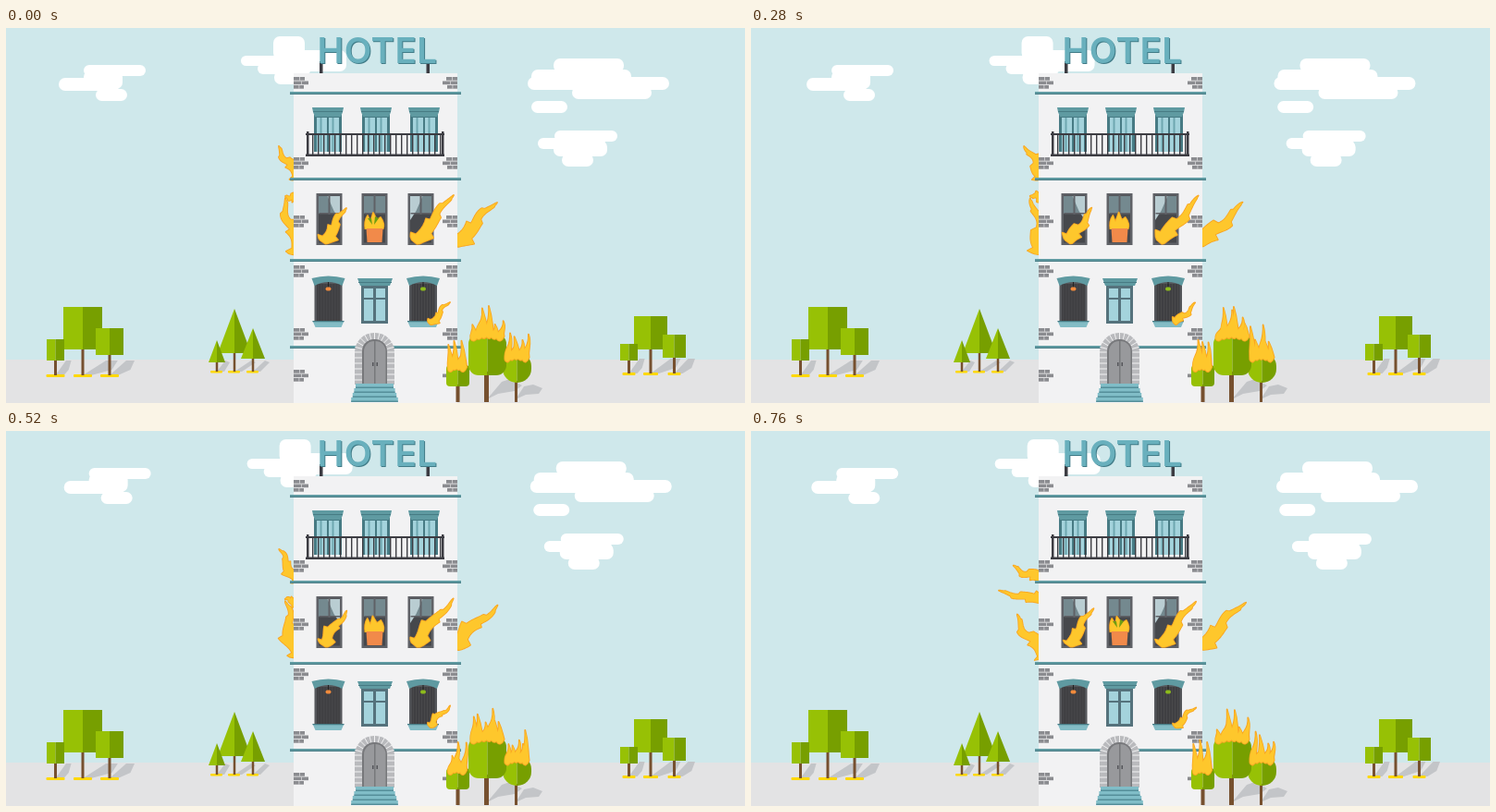
These frames come from a looping animation (799 px wide and 406 px high, 800 ms). An HTML page with a canvas:

```html
<!DOCTYPE html>
<html lang="en">
<head>
<meta charset="utf-8">
<title>Hotel fire</title>
<style>
html, body { margin: 0; width: 100%; height: 100%; overflow: hidden; background: #cfe8eb; }
canvas { display: block; }
</style>
</head>
<body>
<canvas id="stage" width="799" height="406"></canvas>
<script>
const g = document.getElementById('stage').getContext('2d');
const LOOP = 800, STEP = 40, TURN = Math.PI * 2;
const TEAL = '#5f9aa1', DEEP = '#477b84', GLASS = '#a4d3dc', DARK = '#3c3c42', GREY = '#8b8c90';
const LIGHT_GREEN = '#97c105', DARK_GREEN = '#779f00', TRUNK = '#76502f', SHADE = '#c3c5c8';

function box(color, x, y, w, h, r = 0) {
  g.fillStyle = color;
  g.beginPath();
  g.roundRect(x, y, w, h, r);
  g.fill();
}

function poly(color, ...p) {
  g.fillStyle = color;
  g.beginPath();
  for (let i = 0; i < p.length; i += 2) g.lineTo(p[i], p[i + 1]);
  g.fill();
}

// ---------- sky ----------
// drift per loop, then pills: left, top, right, bottom
const clouds = [
  [8.7, [84, 40, 151, 52], [84, 46, 126, 66], [57, 54, 123, 68], [97, 66, 131, 79]],
  [10.2, [289, 9, 323, 34], [300, 24, 368, 47], [254, 30, 322, 41], [272, 38, 330, 50], [290, 46, 322, 61]],
  [4.2, [592, 33, 668, 48], [568, 45, 676, 66], [564, 53, 717, 67], [612, 63, 698, 77]],
  [3.4, [568, 79, 607, 92]],
  [10.4, [593, 111, 661, 123], [575, 119, 648, 131], [592, 122, 650, 139], [601, 136, 635, 150]],
];

function drawSky(t) {
  box('#cfe8eb', 0, 0, 799, 406);
  for (const [drift, ...pills] of clouds)
    for (const [l, top, r, b] of pills)
      box('#fff', l + drift * t / LOOP, top, r - l, b - top, Math.min(7, (b - top) / 2));
  box('#e3e3e4', 0, 359, 799, 47);
}

// ---------- trees ----------
function crown(x, y, w, h, r = 0) {
  g.save();
  g.beginPath();
  g.roundRect(x, y, w, h, r);
  g.clip();
  box(LIGHT_GREEN, x, y, w / 2, h);
  box(DARK_GREEN, x + w / 2, y, w / 2, h);
  g.restore();
}

function trunk(x, y, bottom, w = 3) {
  box(TRUNK, x - w / 2, y, w, bottom - y);
}

function squareTree(x, y, w, h, bottom, patch = 20) {
  const c = x + w / 2;
  poly(SHADE, c, bottom, c + w * .6, bottom - 16, c + w * .9, bottom - 16, c + w * .75, bottom - 6, c + 9, bottom);
  box('#ffd800', c - patch / 2, bottom - 1, patch, 3, 1);
  trunk(c, y + h, bottom);
  crown(x, y, w, h);
}

function conifer(x, y, half, base, bottom) {
  poly(SHADE, x, bottom, x + half, bottom - 12, x + half + 5, bottom - 10, x + 8, bottom);
  box('#ffd800', x - 7, bottom - 1, 13, 2.5, 1);
  trunk(x, base - 2, bottom, 2.5);
  poly(LIGHT_GREEN, x, y, x - half, base, x, base);
  poly(DARK_GREEN, x, y, x + half, base, x, base);
}

function drawTrees() {
  squareTree(62, 302, 42, 46, 376);
  squareTree(44, 337, 19, 23, 376);
  squareTree(97, 325, 30, 29, 376);
  conifer(247, 304, 18, 352, 372);
  conifer(228, 338, 9, 362, 372);
  conifer(267, 325, 13, 358, 372);
  squareTree(679, 312, 36, 36, 374, 16);
  squareTree(664, 342, 19, 18, 374, 14);
  squareTree(710, 332, 25, 25, 374, 14);
}

function drawFrontTrees() {
  poly(SHADE, 520, 402, 536, 383, 545, 380, 558, 387, 550, 393, 532, 396);
  poly(SHADE, 551, 402, 560, 388, 570, 386, 580, 390, 576, 396, 562, 397);
  trunk(488.5, 386, 405, 4);
  trunk(551.5, 382, 405);
  trunk(519.5, 372, 405, 5);
  crown(476, 365, 25, 23, 4);
  crown(537, 353, 31, 31, [13, 13, 15, 15]);
  crown(500, 331, 41, 45, 11);
}

// ---------- building ----------
function quoin(y) {
  [12, 16, 11].forEach((w, i) => {
    const top = y + i * 4.5;
    for (const x of [311, 488 - w]) {
      box(GREY, x, top, w, 3.7);
      box('#d8d8da', x + w / 2, top, .8, 3.7);
    }
  });
}

function sign() {
  box(DARK, 339, 36, 3.5, 13);
  box(DARK, 454.5, 36, 3.5, 13);
  g.font = '600 38.5px Inter, "Open Sans", sans-serif';
  g.letterSpacing = '.5px';
  g.textAlign = 'center';
  for (const [color, d] of [['#417c88', 1], ['#69b0bd', 0]]) {
    g.fillStyle = color;
    g.fillText('HOTEL', 401.5 + d, 38 + d / 2);
  }
}

function topWindow(c) {
  box(DEEP, c - 15, 94, 30, 40);
  for (const x of [-12, 1]) {
    box(GLASS, c + x, 97, 11, 37);
    box('#6ea7b0', c + x + 3.5, 97, 2, 37);
  }
  poly(TEAL, c - 17, 86, c + 17, 86, c + 16, 91, c + 14, 96, c - 14, 96, c - 16, 91);
  box(DEEP, c - 16, 90, 32, 1);
}

function balcony() {
  for (let x = 331; x < 470; x += 6) box(DARK, x, 115, 1.4, 23);
  box(DARK, 324, 114, 150, 2);
  box(DARK, 324, 136.5, 150, 2.5);
  box(DARK, 325, 112, 2.5, 27);
  box(DARK, 471, 112, 2.5, 27);
}

// side: where the curtain hangs, 0 for none
function openWindow(c, side) {
  box('#5f6166', c - 14, 179, 28, 56);
  box('#46484c', c - 11.5, 181.5, 23, 51);
  box('#74898f', c - 11.5, 182, 23, 19);
  if (side) {
    const edge = c + side * 11.5;
    poly('#b9cdd2', edge, 182, c - side * 2, 182, c + side * 5, 198, edge, 208);
  }
  box('#5f6166', c - 1, 181, 2, 21);
  box('#5f6166', c - 11, 200, 23, 1.5);
}

function archWindow(c, lamp) {
  box('#55575b', c - 15, 274, 30, 44);
  box('#3f3f42', c - 12.5, 277, 25, 40);
  for (let x = -11; x < 12; x += 3) box('#4c4c4f', c + x, 277, .8, 40);
  g.fillStyle = TEAL;
  g.beginPath();
  g.moveTo(c - 18, 271);
  g.quadraticCurveTo(c, 266, c + 18, 271);
  g.lineTo(c + 15, 279);
  g.quadraticCurveTo(c, 271, c - 15, 279);
  g.fill();
  box('#222', c - .5, 275, 1, 6);
  box(lamp, c - 3, 280.5, 6, 4, 2);
  poly('#83bcc5', c - 17, 317, c + 17, 317, c + 14, 324, c - 14, 324);
  box(DEEP, c - 17, 317, 34, 1.2);
}

function middleWindow() {
  box('#55727c', 384, 279, 29, 41);
  for (const x of [387, 400]) {
    box(GLASS, x, 282, 10, 10);
    box(GLASS, x, 294, 10, 23);
  }
  poly(TEAL, 380, 271, 418, 271, 415, 279, 383, 279);
  box(DEEP, 381, 275, 36, 1);
}

function door() {
  box('#b9babd', 377, 330, 43, 56, [21, 21, 0, 0]);
  g.strokeStyle = '#f2f2f3';
  g.lineWidth = 1;
  g.beginPath();
  for (let a = 0; a <= 12; a++) {
    const x = -Math.cos(a * Math.PI / 12), y = -Math.sin(a * Math.PI / 12);
    g.moveTo(398.5 + x * 14, 351 + y * 14);
    g.lineTo(398.5 + x * 22, 351 + y * 22);
  }
  for (let y = 357; y < 386; y += 6)
    for (const x of [377, 412]) {
      g.moveTo(x, y);
      g.lineTo(x + 8, y);
    }
  g.stroke();
  box('#77787b', 385, 337, 27, 49, [13, 13, 0, 0]);
  box('#98999c', 387, 339, 11, 46, [11, 0, 0, 0]);
  box('#98999c', 399.5, 339, 11, 46, [0, 11, 0, 0]);
  box('#55565a', 396, 362, 1.5, 4);
  box('#55565a', 400.5, 362, 1.5, 4);
  for (let i = 0; i < 4; i++) {
    box('#80bdc7', 378 - i * 1.6, 385 + i * 5, 41 + i * 3.2, 5);
    box('#548e99', 378 - i * 1.6, 388.5 + i * 5, 41 + i * 3.2, 1.5);
  }
}

function drawBuilding() {
  box('#f2f2f3', 311, 49, 177, 357);
  [53, 140, 203, 257, 325, 370].forEach(quoin);
  for (const y of [69, 162, 250, 344]) {
    box(TEAL, 307, y, 185, 3);
    box(DEEP, 307, y + 2, 185, 1);
  }
  sign();
  [348, 400, 452].forEach(topWindow);
  balcony();
  openWindow(349.5, 1);
  openWindow(398.5, 0);
  openWindow(448.5, -1);
  archWindow(348.5, '#f08a3c');
  archWindow(451, '#8dbb1c');
  middleWindow();
  door();
}

// ---------- fire ----------
// Tips swing three times per loop; a gust pulls the left side outwards late in the loop.
const outdoorFires = [
  { root: [484, 234], tip: [541, 181], swing: [-10, 8], width: 14, bend: 4 },
  { root: [316, 162], tip: [299, 127], swing: [-4, 1], gust: [-13, 18], width: 11, bend: 4 },
  { root: [316, 184], tip: [297, 181], swing: [5, 1], gust: [-32, -9], width: 9, bend: 2 },
  { root: [316, 244], tip: [299, 190], swing: [3, -6], gust: [-13, 12], width: 15, bend: 6 },
];
const indoorFires = [
  { root: [343, 232], tip: [374, 188], swing: [-6, 7], width: 11, bend: 3 },
  { root: [442, 232], tip: [477, 190], swing: [7, -9], width: 12, bend: 3 },
  { root: [458, 320], tip: [483, 303], swing: [-3, -6], width: 6, bend: 3 },
];
const crownFires = [
  { x: 488, y: 368, half: 11, height: 34, tongues: 4 },
  { x: 520.5, y: 334, half: 19, height: 34, tongues: 6 },
  { x: 552.5, y: 357, half: 14, height: 38, tongues: 5 },
];

const smooth = k => (k = Math.min(1, Math.max(0, k)), k * k * (3 - 2 * k));
const saw = v => v - Math.floor(v);
const random = seed => saw(Math.sin(seed * 12.9898) * 43758.5453);

function paintFire() {
  g.lineJoin = 'round';
  g.strokeStyle = '#f9a522';
  g.lineWidth = 1.8;
  g.stroke();
  g.fillStyle = '#fec72c';
  g.fill();
}

// A bent, tapering body whose edges carry licks travelling to the tip
function flame({ root, tip, swing, gust = [0, 0], width, bend }, t) {
  const pulse = Math.cos(3 * TURN * t / LOOP), pull = smooth((t - 520) / 140);
  const [dx, dy] = root.map((r, i) => tip[i] + swing[i] * pulse + gust[i] * pull - r);
  const length = Math.hypot(dx, dy), nx = -dy / length, ny = dx / length, flow = 3 * t / LOOP;
  const at = (u, offset) => {
    const side = offset + bend * Math.sin(TURN * (u - flow / 3)) * Math.sin(Math.PI * u);
    return [root[0] + dx * u + nx * side, root[1] + dy * u + ny * side];
  };
  const body = u => width / 2 * (1 + .2 * pulse) * Math.pow(1 - u, .6) * (.6 + .7 * Math.sin(Math.PI * Math.sqrt(u)));
  const lick = (u, shift) => body(u) * (.65 + .75 * saw(u * 3 - flow + shift) ** 2);
  const N = 36, left = [], right = [];
  for (let i = 0; i <= N; i++) {
    const u = i / N;
    left.push(at(u, lick(u, .2)));
    right.unshift(at(u, -lick(u, .7)));
  }
  g.beginPath();
  [...left, ...right].forEach(p => g.lineTo(...p));
  g.closePath();
  const spark = saw(flow) - .4;
  if (spark > 0 && spark < .3) {
    const [x, y] = at(1 + spark * .6, 0);
    g.moveTo(x, y);
    g.ellipse(x, y, 3, 1.3, Math.atan2(dy, dx), 0, TURN);
  }
  paintFire();
}

// Narrow tongues flickering along a rounded treetop
function crownFire({ x, y, half, height, tongues }, t) {
  const w = half / tongues * 1.25;
  g.beginPath();
  for (let i = 0; i < tongues; i++) {
    const seed = x + i * 7, place = (i + .5) / tongues * 2 - 1;
    const rx = x + place * (half - 2), ry = y + 4 * place * place;
    const beat = Math.sin(TURN * ((2 + i % 2) * t / LOOP + random(seed)));
    const h = height * (.58 + .2 * random(seed + 1) + .22 * beat);
    const tx = rx + 3 * Math.sin(TURN * (t / LOOP + random(seed + 2)));
    g.moveTo(rx - w, ry);
    g.bezierCurveTo(rx - w * 1.3, ry - h * .55, tx + 1, ry - h * .4, tx, ry - h);
    g.bezierCurveTo(tx + 4, ry - h * .6, rx + w * .5, ry - h * .45, rx + w, ry - 3);
    g.quadraticCurveTo(rx, ry + 5, rx - w, ry);
  }
  paintFire();
}

function potFire(t) {
  const a = Math.sin(3 * TURN * t / LOOP), leaves = Math.cos(TURN * t / LOOP) > -.35;
  g.beginPath();
  g.moveTo(388.5, 218);
  g.quadraticCurveTo(387, 209, 391 + a, 203);
  g.lineTo(394, 210);
  g.lineTo(397 + a * 2, 200 - a);
  g.lineTo(401, 208);
  g.lineTo(405 - a, 205);
  g.quadraticCurveTo(410, 212, 407.5, 218);
  paintFire();
  if (leaves) {
    poly('#6f9d12', 396, 213, 391, 206, 395, 206);
    poly('#6f9d12', 398, 213, 399, 204, 403, 206);
  }
  poly('#f18a4a', 389.5, 217, 407.5, 217, 406.5, 232, 390.5, 232);
}

function draw(t) {
  drawSky(t);
  drawTrees();
  outdoorFires.forEach(f => flame(f, t));
  drawBuilding();
  potFire(t);
  indoorFires.forEach(f => flame(f, t));
  drawFrontTrees();
  crownFires.forEach(f => crownFire(f, t));
}

function frame() {
  draw(Math.floor(performance.now() % LOOP / STEP) * STEP);
  requestAnimationFrame(frame);
}
frame();
</script>
</body>
</html>
```
